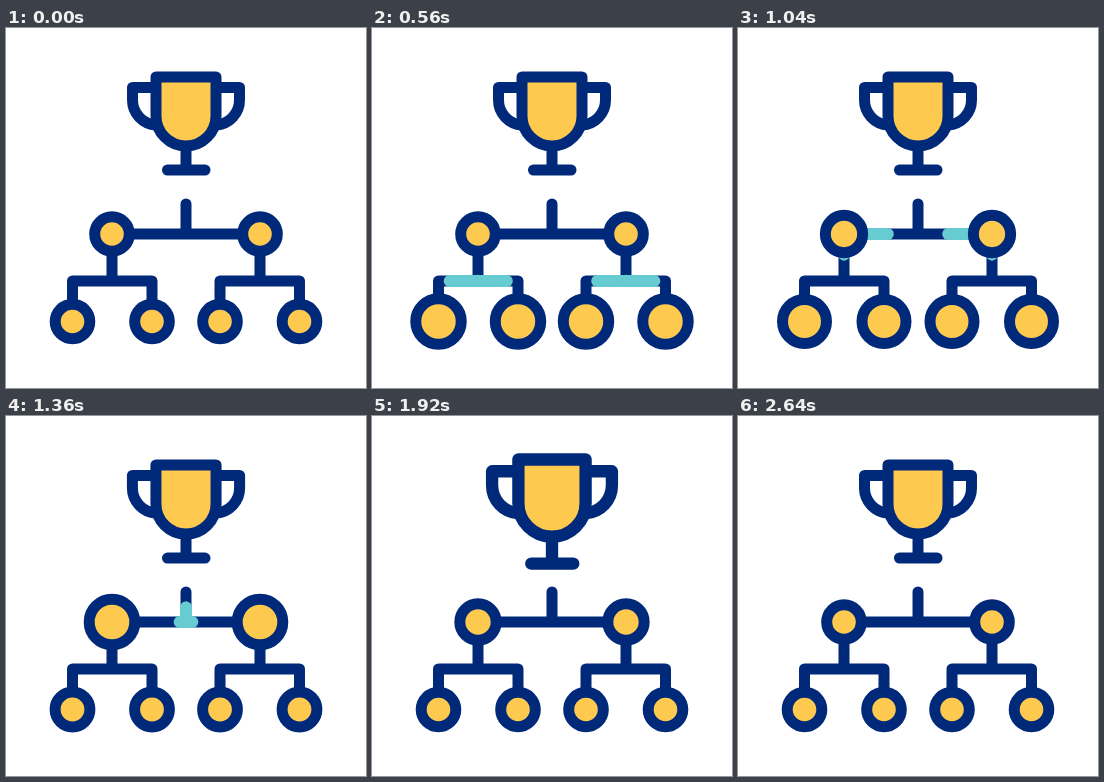
These frames come from a looping animation (360 px wide and 360 px high, 3 s). An HTML page:

```html
<!DOCTYPE html>
<html lang="en">
<head>
<meta charset="utf-8">
<title>Tournament bracket</title>
<style>
  html, body { margin: 0; width: 100%; height: 100%; overflow: hidden; background: #fff; }
  svg { display: block; width: 100vw; height: 100vh; }
  .ink { fill: none; stroke: #00297a; stroke-width: 11; stroke-linecap: round; stroke-linejoin: round; }
  .gold { fill: #fdc94f; }
  .pulse { stroke: #67cbd2; stroke-width: 12; }
</style>
</head>
<body>
<svg viewBox="0 0 360 360">
  <path class="ink" d="M180 176V206M106 206H254M106 206V253M254 206V253
    M66.5 293V253H146V293M214 293V253H293.5V293"/>
  <g id="pulses"></g>
  <g id="nodes"></g>
  <g id="trophy" class="ink">
    <path d="M150 59.5H126.5V72A25 25 0 0 0 150 97M210 59.5H233.5V72A25 25 0 0 1 210 97"/>
    <path d="M180 118V142M161.5 142H199"/>
    <path class="gold" d="M150 49H210V88A30 30 0 0 1 150 88Z"/>
  </g>
</svg>
<script>
const LOOP = 3000;
const SPEED = 0.14; // px per ms along the lines

const $ = id => document.getElementById(id);

function add(parent, tag, attrs) {
  const el = document.createElementNS('http://www.w3.org/2000/svg', tag);
  for (const key in attrs) el.setAttribute(key, attrs[key]);
  return parent.appendChild(el);
}

const clamp = (v, lo, hi) => Math.min(hi, Math.max(lo, v));
const ease = (t, from, to) => (1 - Math.cos(Math.PI * clamp((t - from) / (to - from), 0, 1))) / 2;
// Rises between a and b, holds, falls between c and d.
const swell = (t, [a, b, c, d]) => ease(t, a, b) - ease(t, c, d);

const ring = (cx, cy, beat) => ({
  el: add($('nodes'), 'circle', { cx, cy, class: 'ink gold' }), beat
});
const rings = [
  ...[66.5, 146, 214, 293.5].map(x => ring(x, 293.5, [80, 680, 880, 1400])),
  ...[106, 254].map(x => ring(x, 206, [840, 1480, 1500, 2060]))
];

// Each pulse: its path, when its head and tail leave, and the tail's speed.
function pulse(d, head, tail, tailSpeed) {
  const el = add($('pulses'), 'path', { d, class: 'ink pulse' });
  return { el, head, tail, tailSpeed, length: el.getTotalLength() };
}
const pulses = [
  ...[[66.5, 106], [146, 106], [214, 254], [293.5, 254]].map(([from, to]) =>
    pulse(`M${from} 293V253H${to}V206`, -8, 116, 0.115)),
  ...[106, 254].map(x => pulse(`M${x} 206H180V176`, 728, 878, SPEED))
];

function draw(t) {
  for (const { el, beat } of rings) el.setAttribute('r', 17.3 + 6 * swell(t, beat));

  for (const p of pulses) {
    const head = clamp((t - p.head) * SPEED, 0, p.length);
    const tail = clamp((t - p.tail) * p.tailSpeed, 0, p.length);
    const size = head - tail;
    const on = t >= 80 && size > 0.1;
    el = p.el;
    el.style.display = on ? '' : 'none';
    if (on) {
      el.style.strokeDasharray = `${size} 999`;
      el.style.strokeDashoffset = -tail;
    }
  }

  const scale = 1 + 0.12 * swell(t, [1320, 1860, 1950, 2530]);
  $('trophy').setAttribute('transform', `translate(180 95) scale(${scale}) translate(-180 -95)`);
}

let el;
const start = performance.now();
function tick() {
  draw((performance.now() - start) % LOOP);
  requestAnimationFrame(tick);
}
tick();
</script>
</body>
</html>
```
